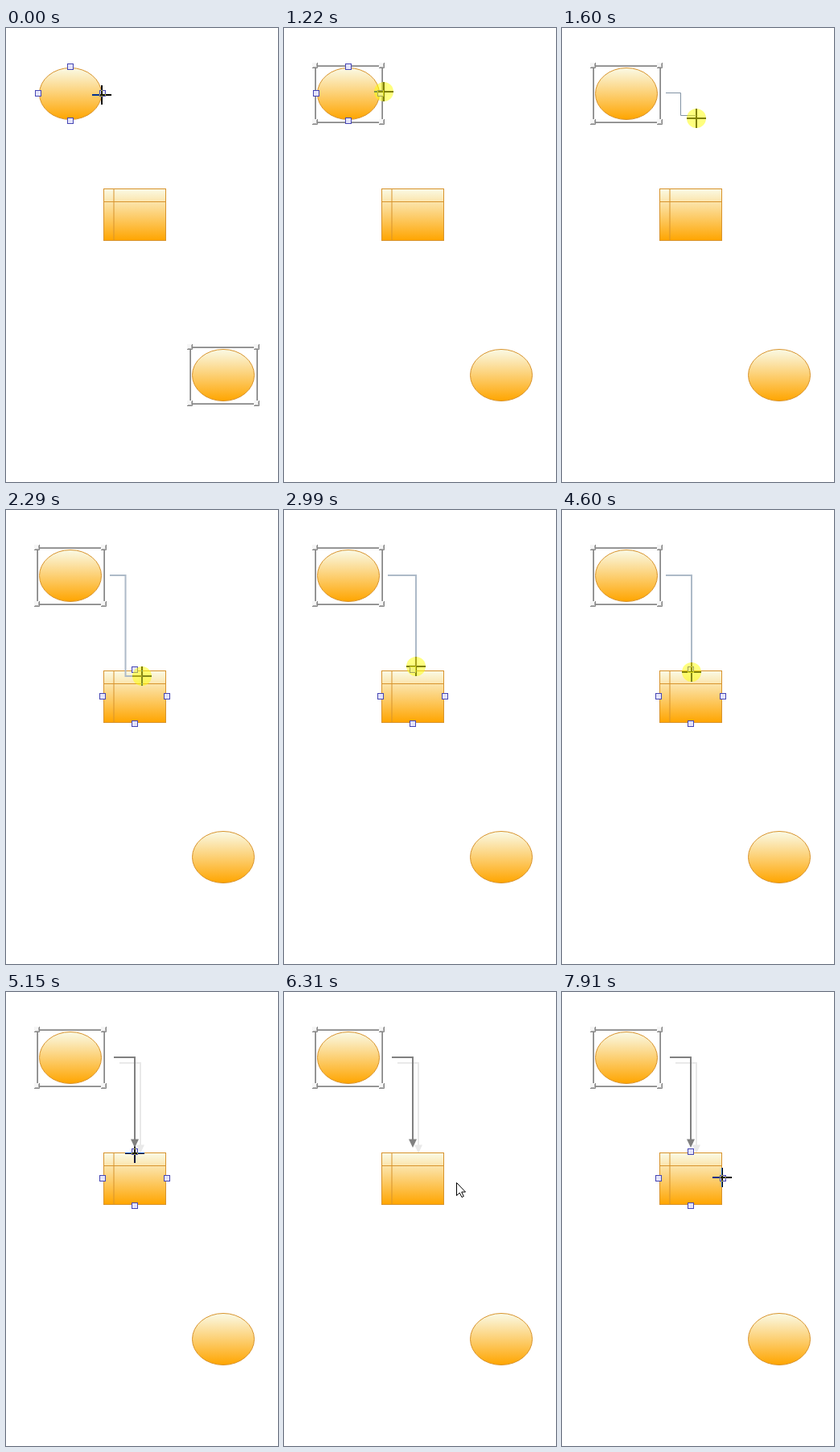
Recreate the animation shown at these times as an HTML page. Size 338 px wide and 563 px high, loop 7.99 s.

```html
<!DOCTYPE html>
<html lang="en">
<head>
<meta charset="utf-8">
<title>Connecting two shapes</title>
<style>
html, body { margin: 0; width: 100%; height: 100%; overflow: hidden; background: #fff; }
svg { display: block; width: 100%; height: 100%; }
#cross { mix-blend-mode: difference; }
</style>
</head>
<body>
<svg viewBox="0 0 338 563" fill="none">
  <defs>
    <linearGradient id="amber" x2="0" y2="1">
      <stop stop-color="#fafae6"/>
      <stop offset="1" stop-color="#ffa500"/>
    </linearGradient>
    <ellipse id="oval" cx="80" cy="81.5" rx="38.5" ry="32" fill="url(#amber)" stroke="#d8932c"/>
    <rect id="port" x="-3.5" y="-3.5" width="7" height="7" fill="#e4e4fa" stroke="#4646b4"/>
    <g id="ports">
      <use href="#port" x="80" y="48"/>
      <use href="#port" x="40" y="81"/>
      <use href="#port" x="120" y="81"/>
      <use href="#port" x="80" y="115"/>
    </g>
    <g id="corner">
      <rect width="7" height="7" fill="#f6f6f6"/>
      <path d="M5.5 1V5.5H1" stroke="#b4b4b4"/>
      <path d="M6.5 0V6.5H0" stroke="#858585"/>
    </g>
    <g id="frame">
      <rect x="38.5" y="46.5" width="83" height="70" stroke="#a8a8a8"/>
      <rect x="39.5" y="47.5" width="83" height="70" stroke="#858585"/>
      <use href="#corner" x="35" y="43"/>
      <use href="#corner" x="118" y="43"/>
      <use href="#corner" x="35" y="113"/>
      <use href="#corner" x="118" y="113"/>
    </g>
    <g id="arrowLine">
      <path d="M134 81H160V184" stroke="currentColor" stroke-width="2"/>
      <path d="M155 182.5H165L160 193Z" fill="currentColor"/>
    </g>
  </defs>

  <rect width="338" height="563" fill="#fff"/>
  <g id="link">
    <use href="#arrowLine" x="7" y="7" color="#e9e9e9"/>
    <use href="#arrowLine" color="#808080"/>
  </g>
  <use href="#oval"/>
  <use href="#oval" x="190" y="349"/>
  <rect x="121.5" y="199.5" width="77" height="64" fill="url(#amber)" stroke="#d8932c"/>
  <path d="M134 200V263M122 215.5H198" stroke="#d8932c"/>
  <use id="selection" href="#frame"/>
  <path id="wire"/>
  <use id="ovalPorts" href="#ports"/>
  <use id="boxPorts" href="#ports" x="80" y="150"/>

  <!-- the cross inverts whatever lies below it -->
  <path id="cross" d="M-12 0H12M0 -12V12" stroke="#fff" stroke-width="2"/>
  <circle id="press" r="12" fill="#ff0" opacity=".5"/>
  <path id="arrow" d="M.5 .5V16.5L4.2 13L7 18.5L9.3 17.4L6.7 12H11.5Z" fill="#fff" stroke="#000"/>
</svg>
<script>
const LOOP = 7990;
const STEP = 76.9;  // ms between screen updates
const LEAD = 22;    // ms by which the first update is shorter

// moments of the interaction, counted in steps
const PRESS = 16, DRAG = 18, HOVER = 24, SNAP = 32, DROP = 66, LEAVE = 79, BACK = 87;

// pointer strokes: first step, last step, where it comes to rest
const home = { x: 119, y: 83 };
const strokes = [
  { from: 8, to: 10, x: 124, y: 79 },
  { from: 17, to: 21, x: 167, y: 112 },
  { from: 21, to: 24, x: 170, y: 210 },
  { from: 28, to: 30, x: 169, y: 206 },
  { from: 30, to: SNAP, x: 165, y: 194 },
  { from: 38, to: 44, x: 161, y: 194 },
  { from: 49, to: 51, x: 161, y: 202 },
  { from: 59, to: 61, x: 160, y: 200 },
  { from: 77, to: 80, x: 228, y: 243 },
  { from: 80, to: 84, x: 200, y: 229 },
  { from: 86, to: 88, x: 196, y: 227 },
  { from: 95, to: 103, x: 199, y: 230 }
];

const $ = id => document.getElementById(id);
const clamp = v => Math.min(1, Math.max(0, v));
const show = (id, on) => $(id).setAttribute("display", on ? "inline" : "none");
const place = (id, x, y) => $(id).setAttribute("transform", `translate(${x} ${y})`);

function pointer(n) {
  let { x, y } = home;
  for (const s of strokes) {
    const p = clamp((n - s.from) / (s.to - s.from));
    x += (s.x - x) * p;
    y += (s.y - y) * p;
  }
  return [Math.round(x), Math.round(y)];
}

function drawWire(n, x, y) {
  const free = n < HOVER;
  const top = free ? 80.5 : 81;
  const mid = free ? (129 + x) / 2 - .5 : (128 + x) / 2;
  const bend = `H${mid}V${free ? y - 3.5 : y}H${x}`;
  const wire = $("wire");
  wire.setAttribute("d", `M129 ${top}` + (n < SNAP ? bend : `H${x}V${y}`));
  wire.setAttribute("stroke", free ? "#8293a4" : "#adbac8");
  wire.setAttribute("stroke-width", free ? 1 : 2);
}

function render(t) {
  const n = Math.floor((t + LEAD) / STEP);
  const within = (from, to) => n >= from && n < to;
  const [x, y] = pointer(n);
  const roaming = within(LEAVE, BACK);

  if (n < PRESS) place("selection", 190, 349);
  else place("selection", 0, 0);
  show("ovalPorts", n < DRAG);
  show("boxPorts", n >= HOVER && n !== DROP && !roaming);
  show("wire", within(DRAG, DROP));
  show("link", n >= DROP);
  show("press", within(PRESS, DROP));
  show("cross", !roaming);
  show("arrow", roaming);

  for (const id of ["cross", "press", "arrow"]) place(id, x, y);
  drawWire(n, x, y);
}

const start = performance.now();
function tick() {
  render((performance.now() - start) % LOOP);
  requestAnimationFrame(tick);
}
tick();
</script>
</body>
</html>
```
